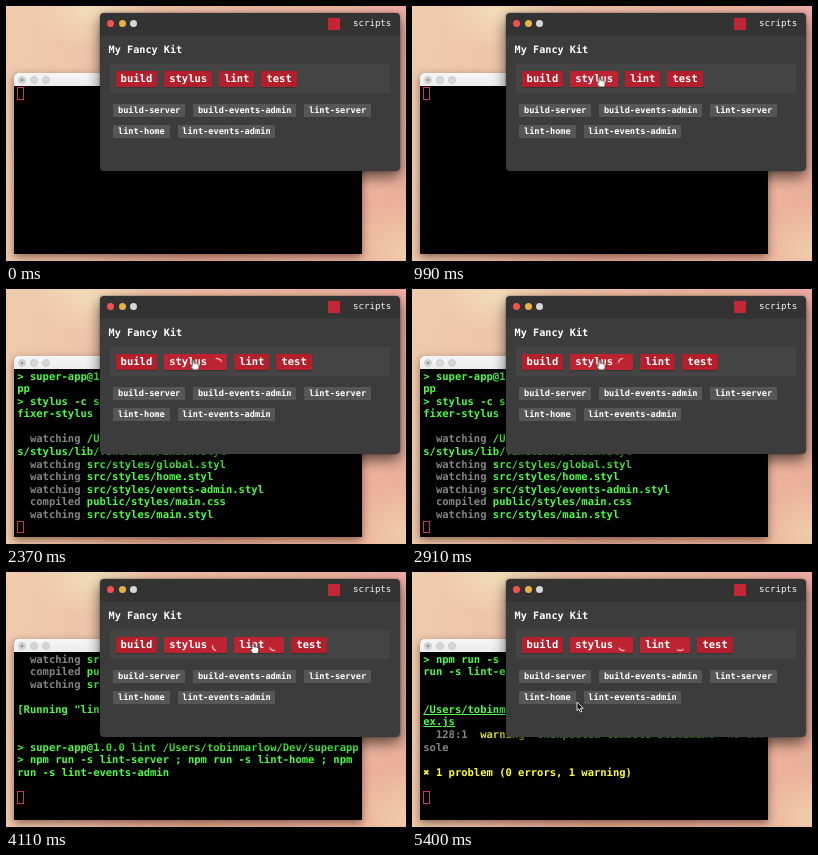
An HTML page for the animation above (5430 ms loop, 400 by 255 pixels).

```html
<!DOCTYPE html>
<html lang="en">
<head>
<meta charset="utf-8">
<title>npm scripts</title>
<style>
  :root { --loop: 5430ms; --line: 12.55px; --red: #b3202c; --hot: #bd2331; }
  * { box-sizing: border-box; }
  html, body { margin: 0; width: 100%; height: 100%; overflow: hidden; }
  body {
    position: relative;
    font: bold 10.5px "DejaVu Sans Mono", monospace;
    text-rendering: geometricPrecision;
    color: #fff;
    background:
      radial-gradient(ellipse 60px 40px at 85px 5px, #f1dcb8 0, transparent 100%),
      radial-gradient(ellipse 70px 110px at 400px 20px, #eeaaa4 0, transparent 100%),
      radial-gradient(ellipse 60px 50px at 400px 245px, #f0cdaa 0, transparent 100%),
      radial-gradient(ellipse 120px 30px at 190px 255px, #e3a992 0, transparent 100%),
      linear-gradient(100deg, #efccae, #ecb9a2 50%, #ebaf9a);
  }
  body *, .dots i { position: absolute; }

  /* Terminal */
  .term {
    left: 8px; top: 67px; width: 347.5px; height: 180.5px;
    border-radius: 4px 4px 0 0; background: #000;
    box-shadow: 0 3px 9px rgba(60, 20, 10, .55);
  }
  .bar {
    left: 0; top: 0; width: 100%; height: 13px;
    border-radius: 4px 4px 0 0;
    background: linear-gradient(#f6f6f6, #ececec);
  }
  .bar i {
    top: 2.5px; width: 8px; height: 8px; border-radius: 50%;
    background: #d6d6d6; border: 1px solid #cbcbcb;
  }
  .bar i:first-child { background: radial-gradient(#999 0 1px, #d6d6d6 2px); }
  .view { left: 0; top: 13px; width: 100%; bottom: 0; overflow: hidden; }
  .roll { left: 3.3px; top: 1.7px; animation: roll var(--loop) step-end infinite; }
  pre {
    left: 0; top: calc(var(--line) * var(--row)); margin: 0;
    font: inherit; line-height: var(--line); color: #4dfc44;
    animation: var(--show) var(--loop) step-end infinite;
  }
  pre span { position: static; }
  .dim { color: #858585; }
  .warn { color: #d8d820; }
  .sum { color: #ffff2e; }
  .path { text-decoration: underline; }
  .caret {
    left: 0; top: -.5px; width: 6.5px; height: 12.5px; border: 1px solid #c23c55;
    animation: caret var(--loop) step-end infinite;
  }

  /* App window */
  .app {
    left: 94px; top: 7px; width: 299.5px; height: 158px; border-radius: 4px;
    background: linear-gradient(#333 0 22px, #3c3c3c 23px);
    box-shadow: 0 6px 14px rgba(0, 0, 0, .6), 0 0 2px rgba(0, 0, 0, .5);
  }
  .dots i { top: 6.5px; width: 7px; height: 7px; border-radius: 50%; }
  .mark { left: 228px; top: 5px; width: 12px; height: 12px; background: #c22733; }
  .word { left: 253px; top: 5px; font-size: 9.1px; line-height: 13px; font-weight: normal; color: #f4f4f4; }
  h1 { left: 8.6px; top: 31px; margin: 0; font-size: 10.2px; line-height: 14px; white-space: nowrap; }
  .tray { left: 10px; top: 51px; width: 280px; height: 29px; background: #444; }
  .row { display: flex; white-space: nowrap; }
  .row b { position: relative; flex: none; }
  .main { left: 15.6px; top: 58px; gap: 7px; }
  .main b {
    height: 16px; padding: 0 5px; line-height: 16.5px; background: var(--red);
    box-shadow: 0 1px 1px rgba(0, 0, 0, .2);
  }
  .small { left: 13.2px; gap: 8px; font-size: 8.64px; }
  .small b { height: 13px; padding: 0 4.8px; line-height: 14px; background: #565656; }
  .stylus { animation: hot-stylus var(--loop) step-end infinite; }
  .lint { animation: hot-lint var(--loop) step-end infinite; }
  .slot {
    position: relative; display: inline-block; height: 10px; vertical-align: middle;
    animation: var(--run) var(--loop) step-end infinite;
  }
  .slot i {
    left: 4.4px; top: .8px; width: 10px; height: 10px; border-radius: 50%;
    border: 1.6px solid transparent; border-top-color: #fff;
    animation: spin var(--loop) linear infinite;
  }
  .lint .slot i { rotate: -28deg; }

  /* Pointer */
  .mouse { left: 0; top: 0; animation: move var(--loop) ease-in-out infinite; }
  .mouse svg { left: 0; top: 0; overflow: visible; stroke-width: .8; stroke-linejoin: round; }
  .arrow { fill: #111; stroke: #fff; animation: arrow var(--loop) step-end infinite; }
  .hand { fill: #fff; stroke: #222; animation: hand var(--loop) step-end infinite; }

  @keyframes roll {
    0% { margin-top: 0; }
    34.3% { margin-top: calc(var(--line) * -4); }
    70.7% { margin-top: calc(var(--line) * -13); }
    86.7%, 100% { margin-top: calc(var(--line) * -21); }
  }
  @keyframes caret {
    0% { margin-top: 0; }
    24.3% { margin-top: calc(var(--line) * 9); }
    34.3% { margin-top: calc(var(--line) * 16); }
    70.7% { margin-top: calc(var(--line) * 24); }
    86.7%, 100% { margin-top: calc(var(--line) * 32); }
  }
  @keyframes show-stylus { 0% { visibility: hidden; } 24.3%, 100% { visibility: visible; } }
  @keyframes show-watch { 0% { visibility: hidden; } 34.3%, 100% { visibility: visible; } }
  @keyframes show-lint { 0% { visibility: hidden; } 70.7%, 100% { visibility: visible; } }
  @keyframes show-report { 0% { visibility: hidden; } 86.7%, 100% { visibility: visible; } }
  @keyframes hot-stylus { 0% { background: var(--red); } 14.7%, 100% { background: var(--hot); } }
  @keyframes hot-lint { 0% { background: var(--red); } 62%, 100% { background: var(--hot); } }
  @keyframes run-stylus { 0% { width: 0; visibility: hidden; } 23.2%, 100% { width: 15px; visibility: visible; } }
  @keyframes run-lint { 0% { width: 0; visibility: hidden; } 69.6%, 100% { width: 15px; visibility: visible; } }
  @keyframes spin { from { transform: rotate(203deg); } to { transform: rotate(3099deg); } }
  @keyframes move {
    0%, 6.4% { transform: translate(150px, 262px); }
    15.7%, 57.1% { transform: translate(187.5px, 70.5px); }
    64.5%, 87.5% { transform: translate(247px, 71px); }
    96.7%, 100% { transform: translate(165px, 130px); }
  }
  @keyframes hand {
    0% { visibility: hidden; }
    14.7% { visibility: visible; }
    90%, 100% { visibility: hidden; }
  }
  @keyframes arrow {
    0% { visibility: visible; }
    14.7% { visibility: hidden; }
    90%, 100% { visibility: visible; }
  }
</style>
</head>
<body>
<div class="term">
  <div class="bar"><i style="left:4px"></i><i style="left:16px"></i><i style="left:27.5px"></i></div>
  <div class="view"><div class="roll">
<pre style="--row:1; --show:show-stylus">[Running "stylus"]


&gt; super-app@1.0.0 stylus /Users/tobinmarlow/Dev/supera
pp
&gt; stylus -c src/styles/main.styl --watch --use autopre
fixer-stylus --out public/styles</pre>
<pre style="--row:9; --show:show-watch"><span class="dim">  watching</span> /Users/tobinmarlow/Dev/superapp/node_module
s/stylus/lib/functions/index.styl
<span class="dim">  watching</span> src/styles/global.styl
<span class="dim">  watching</span> src/styles/home.styl
<span class="dim">  watching</span> src/styles/events-admin.styl
<span class="dim">  compiled</span> public/styles/main.css
<span class="dim">  watching</span> src/styles/main.styl</pre>
<pre style="--row:17; --show:show-lint">[Running "lint"]


&gt; super-app@1.0.0 lint /Users/tobinmarlow/Dev/superapp
&gt; npm run -s lint-server ; npm run -s lint-home ; npm
run -s lint-events-admin</pre>
<pre style="--row:25; --show:show-report"><span class="path">/Users/tobinmarlow/Dev/superapp/server/scripts/api/ind
ex.js</span>
<span class="dim">  128:1</span>  <span class="warn">warning</span>  Unexpected console statement  <span class="dim">no-con
sole</span>

<span class="sum">✖ 1 problem (0 errors, 1 warning)</span></pre>
    <div class="caret"></div>
  </div></div>
</div>

<div class="app">
  <div class="dots">
    <i style="left:7px; background:#f0524d"></i>
    <i style="left:18.5px; background:#e8b04a"></i>
    <i style="left:30px; background:#d6d6d6"></i>
  </div>
  <div class="mark"></div>
  <div class="word">scripts</div>
  <h1>My Fancy Kit</h1>
  <div class="tray"></div>
  <div class="row main">
    <b>build</b>
    <b class="stylus">stylus<span class="slot" style="--run:run-stylus"><i></i></span></b>
    <b class="lint">lint<span class="slot" style="--run:run-lint"><i></i></span></b>
    <b>test</b>
  </div>
  <div class="row small" style="top:90.5px"><b>build-server</b><b>build-events-admin</b><b>lint-server</b></div>
  <div class="row small" style="top:112px"><b>lint-home</b><b>lint-events-admin</b></div>
</div>

<div class="mouse">
  <svg class="arrow" width="8" height="12"><path d="M0 0V8.6L2 6.8L3.4 10L4.9 9.4L3.5 6.3H6.2Z"/></svg>
  <svg class="hand" width="9" height="12"><path d="M-1 1Q0-.8 1 1V4Q2 3 2.8 4.2Q3.8 3.4 4.4 4.6Q5.8 4.2 5.8 5.8V7.5L4.8 10.5H-.2L-3 6.8Q-3 5.4-1 6.4Z"/></svg>
</div>
</body>
</html>
```
